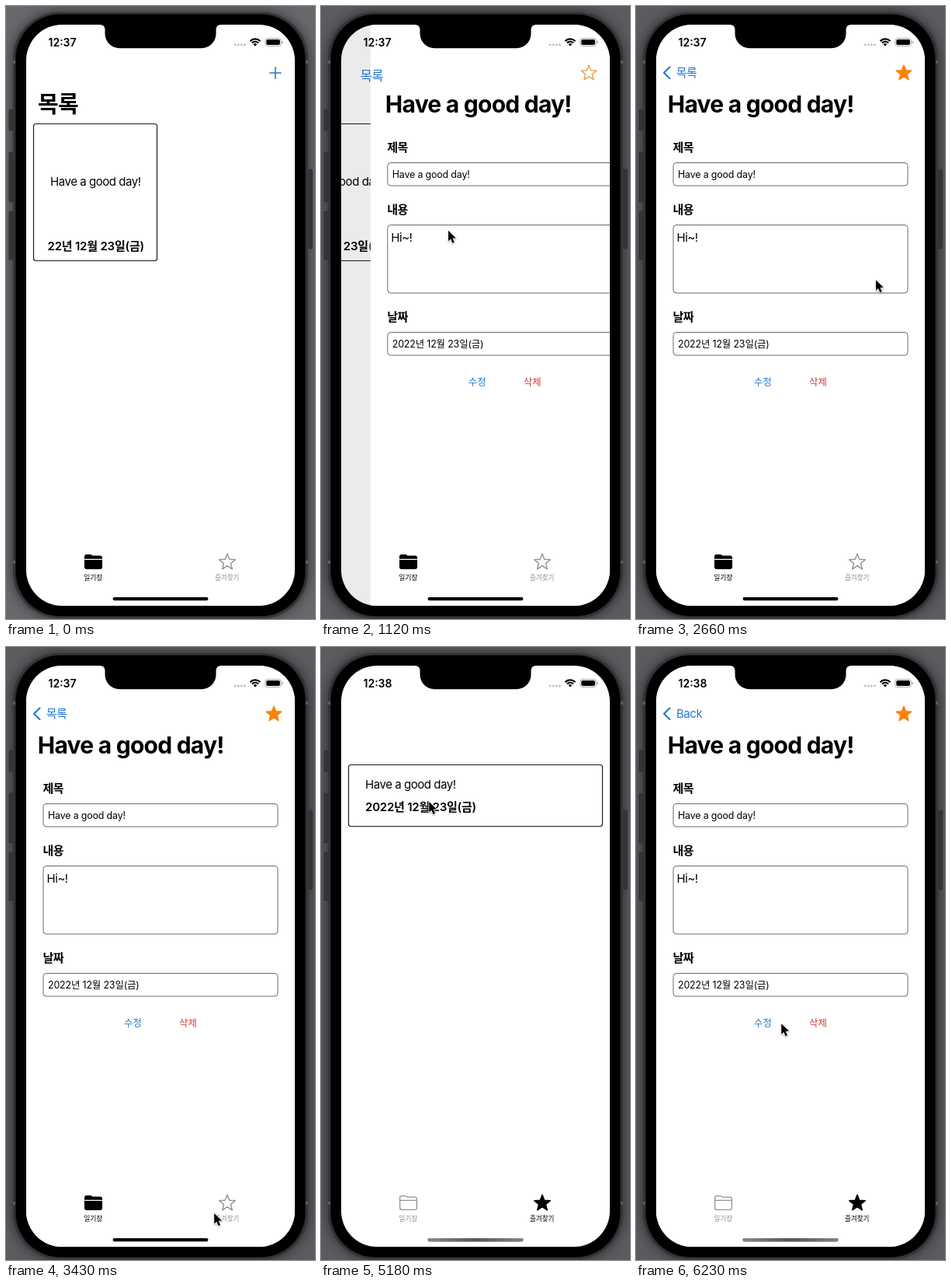
These frames come from a looping animation (398x788 px, 6300 ms). An HTML page with a canvas:

```html
<!DOCTYPE html>
<html lang="ko">
<head>
<meta charset="utf-8">
<title>일기장</title>
<style>
html, body { margin: 0; width: 100%; height: 100%; overflow: hidden; background: #525357; }
canvas { display: block; width: 398px; height: 788px; }
</style>
</head>
<body>
<canvas id="stage"></canvas>
<script>
const W = 398, H = 788, LOOP = 6300, STEP = 70;
const SCREEN = { x: 26, y: 24, w: 346, h: 747, r: 46 };
const BLUE = '#2479cf', RED = '#d23c32', ORANGE = '#fb820c', GRAY = '#929292';
const FONT = 'Inter, "Noto Sans CJK KR", "Noto Sans CJK", sans-serif';

const PUSH_LIST = 913, PUSH_FAV = 5487;
const STAR_ON = 2170, TAB_SWITCH = 3780, CLOCK_TICK = 3990;

// time, x, y of the pointer tip
const POINTER = [
  [70, 241, 767], [700, 164, 288.8], [1400, 164, 288.8], [1820, 342.7, 98.8],
  [2100, 342, 83.5], [2310, 342, 83.5], [3010, 276, 621], [3200, 289, 680],
  [3360, 260, 724], [3430, 268.2, 728], [3640, 279, 718], [4620, 279, 718],
  [5180, 139.2, 199], [5860, 139.2, 199], [6090, 168, 340], [6230, 187.2, 484.2]
];

const canvas = document.getElementById('stage');
const c = canvas.getContext('2d');
const dpr = window.devicePixelRatio || 1;
canvas.width = W * dpr;
canvas.height = H * dpr;

const clamp = v => Math.max(0, Math.min(1, v));
const lerp = (a, b, k) => a + (b - a) * k;
const smooth = k => k * k * (3 - 2 * k);

function box(x, y, w, h, r, fill, stroke, line = 1) {
  c.beginPath();
  c.roundRect(x, y, w, h, r);
  if (fill) { c.fillStyle = fill; c.fill(); }
  if (stroke) { c.strokeStyle = stroke; c.lineWidth = line; c.stroke(); }
}

function text(str, x, y, size, { weight = 400, color = '#000', gap = 0, align = 'left' } = {}) {
  c.font = `${weight} ${size}px ${FONT}`;
  c.letterSpacing = gap + 'px';
  c.textAlign = align;
  c.fillStyle = color;
  c.fillText(str, x, y);
}

function line(points, color, width) {
  c.beginPath();
  points.forEach(([x, y]) => c.lineTo(x, y));
  c.strokeStyle = color;
  c.lineWidth = width;
  c.lineCap = c.lineJoin = 'round';
  c.stroke();
}

function faded(alpha, draw) {
  if (alpha <= 0) return;
  c.save();
  c.globalAlpha *= alpha;
  draw();
  c.restore();
}

function star(x, y, r, color, filled) {
  c.beginPath();
  for (let i = 0; i < 10; i++) {
    const a = -Math.PI / 2 + i * Math.PI / 5;
    const d = i % 2 ? r * 0.43 : r;
    c.lineTo(x + d * Math.cos(a), y + d * Math.sin(a));
  }
  c.closePath();
  c.lineJoin = 'round';
  c.lineWidth = 1.4;
  c.strokeStyle = c.fillStyle = color;
  if (filled) c.fill();
  c.stroke();
}

function folder(filled) {
  c.beginPath();
  c.moveTo(101.6, 708);
  c.quadraticCurveTo(101.6, 705.7, 104, 705.7);
  c.lineTo(108.5, 705.7);
  c.quadraticCurveTo(110, 705.7, 111, 707.2);
  c.lineTo(121, 707.2);
  c.quadraticCurveTo(123.4, 707.2, 123.4, 709.5);
  c.lineTo(123.4, 721);
  c.quadraticCurveTo(123.4, 723.3, 121, 723.3);
  c.lineTo(104, 723.3);
  c.quadraticCurveTo(101.6, 723.3, 101.6, 721);
  c.closePath();
  c.lineWidth = 1.3;
  c.strokeStyle = c.fillStyle = filled ? '#000' : GRAY;
  if (filled) c.fill();
  c.stroke();
  line([[101.6, 711.3], [123.4, 711.3]], filled ? '#fff' : GRAY, 1.2);
}

function body(t) {
  c.fillStyle = t < 770 ? '#68696d' : '#5b5c60';
  c.fillRect(0, 0, W, H);
  c.save();
  c.shadowColor = 'rgba(0,0,0,0.55)';
  c.shadowBlur = 16 * dpr;
  box(9, 8, 380, 779, 60, '#29292c');
  c.restore();
  [[4, 133, 27], [4, 188, 64], [4, 264, 62], [390, 210, 102]].forEach(([x, y, h]) =>
    box(x, y, 4.5, h, 1.5, '#343538', '#28282b', 0.6));
  box(9.5, 8.5, 379, 778, 60, '#3a3b3e');
  box(11.5, 10, 375, 775, 58, '#1b1b1d');
  c.fillStyle = '#5a5a5d';
  [70, 713].forEach(y => { c.fillRect(9, y, 3, 4); c.fillRect(386, y, 3, 4); });
  box(13, 11, 372, 773, 57, '#000');
}

function listCards() {
  box(35.5, 151.5, 159, 176, 3, null, '#1c1c1c', 1.2);
  text('Have a good day!', 57, 231, 15, { gap: -0.45 });
  text('22년 12월 23일(금)', 53.5, 314, 15, { weight: 600, gap: -0.2 });
}

function favCards() {
  box(35.5, 151.5, 327, 79, 3, null, '#1c1c1c', 1.2);
  text('Have a good day!', 57, 182, 15, { gap: -0.45 });
  text('2022년 12월 23일(금)', 57, 210.5, 15, { weight: 600, gap: -0.22 });
}

function form() {
  const label = { weight: 600, gap: -0.5 };
  text('제목', 47.5, 186.5, 15, label);
  text('내용', 47.5, 266.5, 15, label);
  text('날짜', 47.5, 404.5, 15, label);
  [[201, 30], [281, 88], [419, 30]].forEach(([y, h]) =>
    box(48, y + 0.5, 302, h - 0.5, 4, null, '#6b6b6b'));
  text('Have a good day!', 54, 220.5, 12.4, { gap: -0.15 });
  text('Hi~!', 52.5, 302.5, 15, { gap: -0.45 });
  text('2022년 12월 23일(금)', 54, 439, 12.4, { gap: -0.14 });
  text('수정', 163.5, 488, 12.4, { color: BLUE, align: 'center' });
  text('삭제', 234.5, 488, 12.4, { color: RED, align: 'center' });
}

function plus() {
  line([[339.8, 86], [354.2, 86]], BLUE, 1.6);
  line([[347, 78.8], [347, 93.2]], BLUE, 1.6);
}

// Large list title shrinking into the back button label
function listLabel(k, s) {
  const scale = lerp(29 / 15, 1, k);
  c.save();
  c.translate(lerp(41, 51.7, k), lerp(136.5, 90.8, k));
  c.scale(scale, scale);
  const black = clamp(1 - s / 0.15);
  const weight = black > 0.5 ? 700 : 400;
  if (black < 1) text('목록', 0, 0, 15, { weight, color: BLUE, gap: -0.4 });
  faded(black, () => text('목록', 0, 0, 15, { weight, gap: -0.4 }));
  c.restore();
}

function screen(t) {
  const fav = t >= TAB_SWITCH;
  const s = (t - (fav ? PUSH_FAV : PUSH_LIST)) / 1000;
  const w = Math.max(0, s) * 18.26;
  const rest = (1 + w) * Math.exp(-w);
  const titleRest = Math.pow(1 - clamp(s / 0.345), 2.3);
  const off = rest * SCREEN.w;

  c.save();
  c.beginPath();
  c.roundRect(SCREEN.x, SCREEN.y, SCREEN.w, SCREEN.h, SCREEN.r);
  c.fillStyle = '#fff';
  c.fill();
  c.clip();

  c.save();
  c.translate(-104 * (1 - rest), 0);
  (fav ? favCards : listCards)();
  c.restore();

  if (s > 0) {
    c.fillStyle = `rgba(0,0,0,${0.09 * (1 - rest)})`;
    c.fillRect(SCREEN.x, SCREEN.y, SCREEN.w, SCREEN.h);
    c.fillStyle = '#fff';
    c.fillRect(SCREEN.x + off, SCREEN.y, SCREEN.w, SCREEN.h);
    c.save();
    c.translate(off, 0);
    form();
    c.restore();
    text('Have a good day!', 40.8 + titleRest * SCREEN.w, 137, 30, { weight: 700, gap: -0.76 });
    const starred = t >= STAR_ON;
    faded(clamp(s / 0.25), () => star(345, 86.3, 10.3, starred ? ORANGE : '#e98a24', starred));
    faded(clamp((s - 0.21) / 0.1), () => line([[43.5, 78.5], [36, 85.7], [43.5, 93]], BLUE, 2.1));
  }
  if (!fav) {
    listLabel(1 - titleRest, s);
    faded(clamp(1 - s / 0.15), plus);
  } else {
    faded(clamp(s / 0.3), () =>
      text('Back', 52 + titleRest * 100, 91, 15, { color: BLUE, gap: -0.45 }));
  }

  tabs(fav);
  indicator(t);
  c.restore();
}

function tabs(fav) {
  folder(!fav);
  star(285, 715, 10.9, fav ? '#000' : GRAY, fav);
  const label = on => ({ weight: 500, align: 'center', color: on ? '#000' : GRAY });
  text('일기장', 112.3, 737.6, 8.8, label(!fav));
  text('즐겨찾기', 284.7, 737.6, 8.6, label(fav));
}

function indicator(t) {
  box(137.5, 760, 123, 4.2, 2.1, '#000');
  const g = c.createLinearGradient(137, 0, 261, 0);
  g.addColorStop(0, '#8a8a8a');
  g.addColorStop(0.5, '#555');
  g.addColorStop(1, '#858585');
  faded(clamp((t - TAB_SWITCH + STEP) / 420), () => box(137.5, 760, 123, 4.2, 2.1, g));
}

function notch() {
  c.beginPath();
  c.moveTo(121, 23);
  c.lineTo(121, 24);
  c.quadraticCurveTo(127, 24, 127.5, 30);
  c.lineTo(127.5, 35);
  c.arcTo(127.5, 54.2, 147, 54.2, 18.5);
  c.lineTo(251, 54.2);
  c.arcTo(270.5, 54.2, 270.5, 35, 18.5);
  c.lineTo(270.5, 30);
  c.quadraticCurveTo(271, 24, 277, 24);
  c.lineTo(277, 23);
  c.fillStyle = '#000';
  c.fill();
}

function status(t) {
  text(t < CLOCK_TICK ? '12:37' : '12:38', 54.5, 51.5, 14, { weight: 600 });
  for (let i = 0; i < 4; i++) box(293.8 + i * 4.1, 48.6, 2.8, 2.8, 1.4, '#bdbdbd');

  c.strokeStyle = c.fillStyle = '#000';
  c.lineCap = 'butt';
  c.lineWidth = 2.1;
  [5.6, 8.9].forEach(r => {
    c.beginPath();
    c.arc(321, 51.3, r, -Math.PI * 0.76, -Math.PI * 0.24);
    c.stroke();
  });
  c.beginPath();
  c.moveTo(321, 51.8);
  c.arc(321, 51.3, 3.2, -Math.PI * 0.76, -Math.PI * 0.24);
  c.fill();

  box(333.8, 41.5, 20.6, 10, 3, null, '#a0a0a0', 0.9);
  box(335.3, 43, 17.6, 7, 1.8, '#000');
  box(355.5, 45, 1.4, 3.2, 0.7, '#a0a0a0');
}

function pointer(t) {
  if (t < POINTER[0][0]) return;
  const i = POINTER.findIndex(p => p[0] > t);
  const b = POINTER[i < 0 ? POINTER.length - 1 : i];
  const a = i < 0 ? b : POINTER[i - 1];
  const k = a === b ? 0 : smooth((t - a[0]) / (b[0] - a[0]));
  c.save();
  c.translate(lerp(a[1], b[1], k), lerp(a[2], b[2], k));
  c.beginPath();
  [[0, 0], [0, 13.5], [3.1, 10.7], [5.3, 16], [7.8, 15], [5.6, 9.8], [9.8, 9.6]]
    .forEach(([x, y]) => c.lineTo(x, y));
  c.closePath();
  c.lineJoin = 'round';
  c.lineWidth = 1.6;
  c.strokeStyle = '#fff';
  c.shadowColor = 'rgba(0,0,0,0.35)';
  c.shadowBlur = 2 * dpr;
  c.shadowOffsetY = dpr;
  c.stroke();
  c.shadowColor = 'transparent';
  c.fillStyle = '#000';
  c.fill();
  c.restore();
}

const start = performance.now();

function frame(now) {
  const elapsed = Math.max(0, now - start) % LOOP;
  const t = Math.floor(elapsed / STEP) * STEP;
  c.setTransform(dpr, 0, 0, dpr, 0, 0);
  body(t);
  screen(t);
  notch();
  status(t);
  pointer(t);
  requestAnimationFrame(frame);
}
requestAnimationFrame(frame);
</script>
</body>
</html>
```
